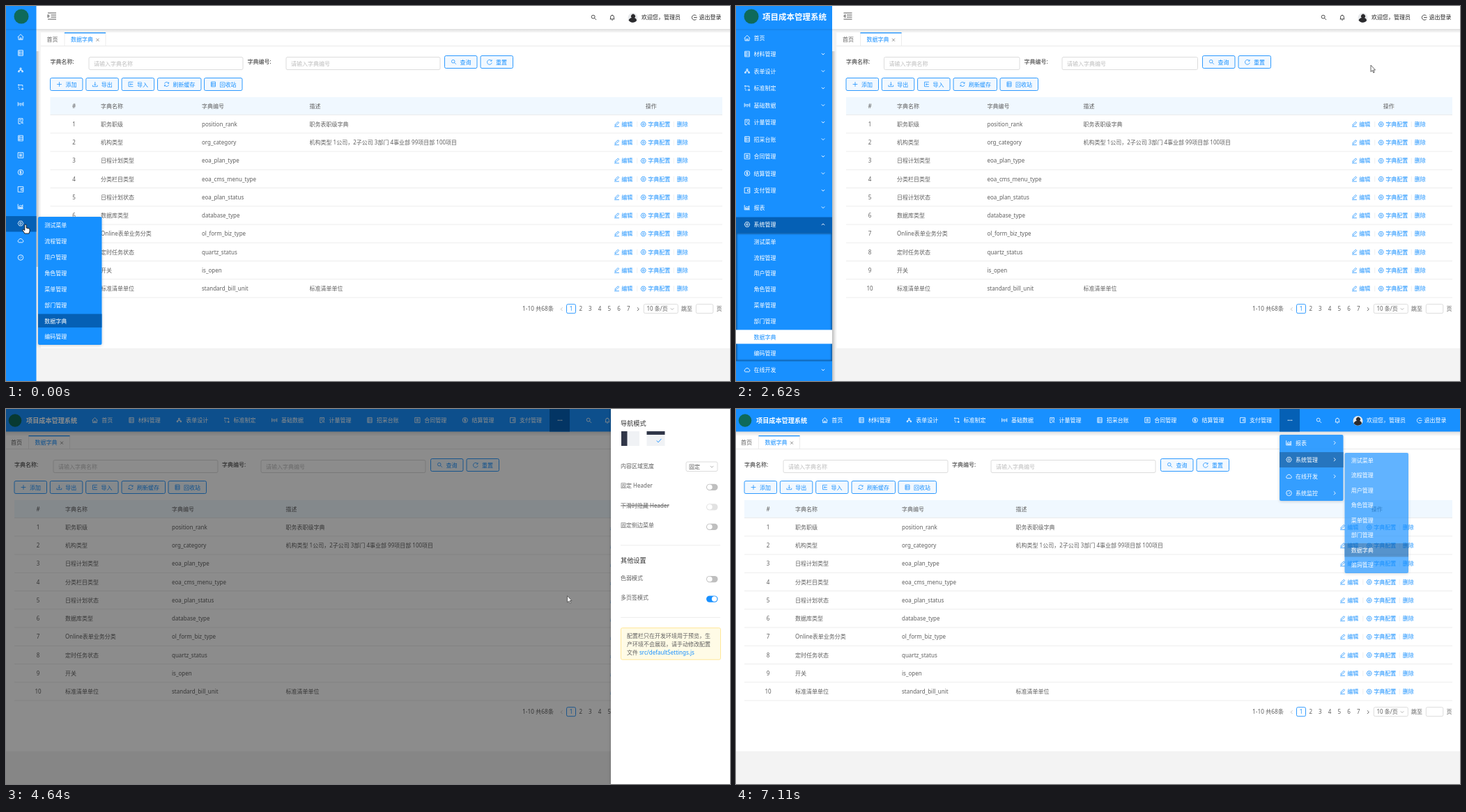
Recreate the animation shown at these times as an HTML page. Size 1039x539 px, loop 7190 ms.

```html
<!DOCTYPE html>
<html lang="zh-CN">
<head>
<meta charset="utf-8">
<style>
html, body { margin: 0; width: 100%; height: 100%; overflow: hidden; background: #fff; }
svg { display: block; width: 100vw; height: 100vh; }
text { font-family: "Noto Sans", "Noto Sans CJK SC", "Noto Sans CJK", sans-serif; white-space: pre; }
</style>
</head>
<body>
<svg viewBox="0 0 1039 539">
  <defs>
    <linearGradient id="side"><stop stop-opacity=".22"/><stop offset="1" stop-opacity="0"/></linearGradient>
    <linearGradient id="down" x2="0" y2="1"><stop stop-opacity=".09"/><stop offset="1" stop-opacity="0"/></linearGradient>
    <filter id="soft" x="-20%" y="-20%" width="140%" height="140%"><feDropShadow dx="0" dy="1" stdDeviation="2" flood-opacity=".2"/></filter>
    <filter id="blur"><feGaussianBlur stdDeviation="1.3"/></filter>
  </defs>
  <g id="page"></g>
  <g id="over"></g>
</svg>
<script>
const LOOP = 7190, W = 1039, H = 539;
const BLUE = '#1890ff', DARK = '#0560b5', INK = '#606060', LINE = '#e8e8e8';

const ring = 'M-4 0A4 4 0 1 0 4 0A4 4 0 1 0-4 0';
const icons = {
  home: 'M-4.4.4L0-4 4.4.4M-3.2-.4V4H3.2V-.4M-1 4V1.5H1V4',
  doc: 'M-3.5-4H3.5V4H-3.5ZM-3.5-1.3H3.5M-3.5 1.4H3.5M-2-2.6H-1M-2 0H-1M-2 2.7H-1',
  tree: 'M-1-3H1V-1H-1ZM0-1V.4M-2.7 1.6V.4H2.7V1.6M-3.6 1.6H-1.8V3H-3.6ZM1.8 1.6H3.6V3H1.8Z',
  crop: 'M-3-4.2V-2M-4.2-3H3V-.6M-3-.8V1.4M3 .8V4.4M-3 3H-1M.4 3H4.4',
  radio: 'M-4-3V3M4-3V3M-2.2-1.8V1.8M2.2-1.8V1.8M0-1V3M-.8-1H.8',
  audit: 'M0 4H-3.2V-4H3.2V0M-1.6-2H1.6M-1.6 0H0M.6 1.8A1.3 1.3 0 1 0 3.2 1.8A1.3 1.3 0 1 0 .6 1.8M2.8 2.8L4 4',
  list: 'M-4-4H4V4H-4ZM-2-1.6H2M-2 0H2M-2 1.6H2',
  money: ring + 'M1.4-1.2C.6-2.2-1.4-1.9-1.4-.9S1.4 0 1.4 1-.8 2.2-1.5 1.2M0-2.6V2.6',
  wallet: 'M-4-4H4V4H-4ZM4-1.3H.5V1.3H4',
  chart: 'M-4-3.5V3.5H4M-2.4 2.4V.2L-.6-1.6 1 0 3-2.4V2.4ZM-2 1.5H3',
  gear: 'M-2-3.5H2L4 0 2 3.5H-2L-4 0ZM-1.4 0A1.4 1.4 0 1 0 1.4 0A1.4 1.4 0 1 0-1.4 0',
  cloud: 'M-2.5 3A2 2 0 0 1-2.8-.8A3 3 0 0 1 2.8-.8A2 2 0 0 1 2.5 3Z',
  gauge: ring + 'M0 1L1.8-1.2M-2.4.6H-1.8M0-2.5V-1.9',
  pencil: 'M-4 4H4M-3 2.2L-2.6.2 2.2-4.2 3.8-2.6-1 1.8Z',
  search: 'M-3.6-1A2.7 2.7 0 1 0 1.8-1A2.7 2.7 0 1 0-3.6-1M1.2 1L4 3.8',
  reload: 'M3.2-2A4 4 0 1 0 3.8 1.2M3.6-4V-1.6H1.2',
  sync: 'M3.4-1.6A3.8 3.8 0 0 0-3.6-1M-3.4 1.6A3.8 3.8 0 0 0 3.6 1M3.6-3.6V-1.4H1.6M-3.6 3.6V1.4H-1.6',
  plus: 'M-4 0H4M0-4V4',
  load: 'M0-4V1.6M-1.8 0L0 1.8 1.8 0M-4 1.4V3.8H4V1.4',
  into: 'M4-3.8H-3.6V3.8H4M-1 0H3.6M-1.6 0L.2-1.6M-1.6 0L.2 1.6',
  bell: 'M-3.6 2.6H3.6M-2.7 2.6V-.8A2.7 2.7 0 0 1 2.7-.8V2.6M0-4.4V-3.5M-1 4H1',
  exit: 'M3-2.6A4 4 0 1 0 3 2.6M-1 0H4.2',
  wrench: 'M-3.8 3.8L.4-.4M3.6-2.6A2.4 2.4 0 1 1 1.8-3.8L1.6-2Z',
  fold: 'M-6-4.5H6M-1.5-1.5H6M-1.5 1.5H6M-6 4.5H6M-6-2L-3.6 0-6 2Z',
  unfold: 'M-6-4.5H6M-1.5-1.5H6M-1.5 1.5H6M-6 4.5H6M-3.6-2L-6 0-3.6 2Z',
  down: 'M-2.2-1.1L0 1.1 2.2-1.1', up: 'M-2.2 1.1L0-1.1 2.2 1.1',
  left: 'M1.1-2.4L-1.3 0 1.1 2.4', right: 'M-1.1-2.4L1.3 0-1.1 2.4',
  close: 'M-2-2L2 2M2-2L-2 2', check: 'M-3.2 0L-1 2.4 3.4-2.6',
};

const menu = [['home', '首页'], ['doc', '材料管理'], ['tree', '表单设计'], ['crop', '标准制定'], ['radio', '基础数据'],
  ['audit', '计量管理'], ['doc', '招采台账'], ['list', '合同管理'], ['money', '结算管理'], ['wallet', '支付管理'],
  ['chart', '报表'], ['gear', '系统管理'], ['cloud', '在线开发'], ['gauge', '系统监控']];
const subMenu = ['测试菜单', '流程管理', '用户管理', '角色管理', '菜单管理', '部门管理', '数据字典', '编码管理'];
const rows = [['职务职级', 'position_rank', '职务表职级字典'],
  ['机构类型', 'org_category', '机构类型 1公司，2子公司 3部门 4事业部 99项目部 100项目'],
  ['日程计划类型', 'eoa_plan_type'], ['分类栏目类型', 'eoa_cms_menu_type'], ['日程计划状态', 'eoa_plan_status'],
  ['数据库类型', 'database_type'], ['Online表单业务分类', 'ol_form_biz_type'], ['定时任务状态', 'quartz_status'],
  ['开关', 'is_open'], ['标准清单单位', 'standard_bill_unit', '标准清单单位']];

// Horizontal positions for each navigation layout
const slim = { L: 0, in1: 119, lab2: 346.5, in2: 402, w: 221, btn: 629, name: 136, code: 281, desc: 435.5, op: 0 };
const wide = { L: 94.5, in1: 212.5, lab2: 413.5, in2: 468, w: 194.5, btn: 669, name: 231, code: 360.5, desc: 498.5, op: 11 };
const full = { L: -51.5, in1: 68, lab2: 310, in2: 366, w: 236, btn: 609, name: 85, code: 238, desc: 401.5, op: -6 };

// Pointer path: time, x, y, hand (1) or arrow (0)
const path = [[0, 28, 314, 1], [1090, 28, 314, 1], [1480, 53, 137, 0], [1740, 65, 22, 1], [2140, 65, 22, 1],
  [2600, 911, 85, 0], [2660, 911, 85, 0], [3000, 932, 14, 1], [3160, 932, 14, 1], [3300, 932, 37, 1],
  [4140, 932, 37, 1], [4320, 937, 36, 1], [4480, 937, 36, 1], [4780, 700, 455, 0], [5230, 700, 455, 0],
  [5460, 799, 9, 1], [5780, 799, 9, 1], [5950, 807, 46, 1], [6030, 809, 65, 1], [6280, 809, 65, 1],
  [6600, 905, 110, 1], [6950, 930, 548, 0], [LOOP, 930, 548, 0]];

const mix = (a, b, u) => a + (b - a) * u;
const ramp = (t, a, b) => Math.min(1, Math.max(0, (t - a) / (b - a)));
const smooth = u => u * u * (3 - 2 * u);

// cubic-bezier(.7, .3, .1, 1)
function glide(u) {
  let lo = 0, hi = 1;
  const at = (s, a, b) => 3 * s * (1 - s) ** 2 * a + 3 * s * s * (1 - s) * b + s ** 3;
  for (let i = 0; i < 20; i++) {
    const s = (lo + hi) / 2;
    if (at(s, .7, .1) < u) lo = s; else hi = s;
  }
  return at(lo, .3, 1);
}

const rect = (x, y, w, h, fill, more = '') => `<rect x="${x}" y="${y}" width="${w}" height="${h}" fill="${fill}" ${more}/>`;
const box = (x, y, w, h, stroke, fill = '#fff') => rect(x, y, w, h, fill, `rx="2" stroke="${stroke}" stroke-width=".9"`);
const text = (x, y, s, fill = INK, size = 8, more = '') =>
  `<text x="${x}" y="${y + size * .37}" font-size="${size}" fill="${fill}" ${more}>${s}</text>`;
const mid = (x, y, s, fill) => text(x, y, s, fill, 8, 'text-anchor="middle"');
const icon = (name, x, y, color, k = 1) =>
  `<path d="${icons[name]}" transform="translate(${x} ${y}) scale(${k})" fill="none" stroke="${color}" stroke-width=".9"/>`;
const group = (s, attrs) => `<g ${attrs}>${s}</g>`;

function button(x, y, w, name, label) {
  return box(x, y, w, 18, BLUE, '#f1f8ff') + icon(name, x + 13, y + 9, BLUE, .85) + text(x + 22, y + 9.3, label, BLUE);
}

function userBar(dx, color) {
  return icon('search', 843.5 + dx, 16.5, color, .9) + icon('bell', 870 + dx, 16.5, color, .9) +
    `<circle cx="${899.5 + dx}" cy="17" r="7" fill="#e8eaec"/>
     <path d="M${893.5 + dx} 20.5Q${895 + dx} 17 ${898 + dx} 17A3 3 0 1 1 ${902 + dx} 17Q${905 + dx} 18 ${905 + dx} 21A7 7 0 0 1 ${893.5 + dx} 20.5Z" fill="#2b2b2e"/>` +
    text(912 + dx, 16.5, '欢迎您，管理员', color) + icon('exit', 988 + dx, 16.5, color, .9) + text(994.5 + dx, 16.5, '退出登录', color);
}

function content(p, left) {
  const { L } = p, x0 = L + 63.5;
  let s = rect(left, 38, W - left, 454, '#fff') + rect(left, 57, W - left, .9, LINE) +
    text(L + 58.5, 48.5, '首页') + rect(L + 84, 38, 59, 19.5, '#fff', `stroke="${LINE}" stroke-width=".8"`) +
    rect(L + 84, 38, 59, 1.3, BLUE) + text(L + 93, 48.5, '数据字典', BLUE) + icon('close', L + 131.5, 48.7, '#888');
  s += text(x0, 80.5, '字典名称:', '#333') + box(p.in1, 73.5, p.w, 18, '#d9d9d9') + text(p.in1 + 7, 83, '请输入字典名称', '#bfbfbf') +
    text(p.lab2, 80.5, '字典编号:', '#333') + box(p.in2, 73.5, p.w, 18, '#d9d9d9') + text(p.in2 + 7, 83, '请输入字典编号', '#bfbfbf') +
    button(p.btn + .5, 71.5, 46.5, 'search', '查询') + button(p.btn + 52, 71.5, 46.5, 'reload', '重置');
  [[0, 46.5, 'plus', '添加'], [51.3, 46.5, 'load', '导出'], [102.6, 46.5, 'into', '导入'], [154, 62.5, 'sync', '刷新缓存'],
    [221, 54.5, 'doc', '回收站']].forEach(([dx, w, i, label]) => s += button(x0 + dx, 103.5, w, i, label));

  s += rect(x0, 131, 1028 - x0, 25.5, '#f0f8ff') + rect(x0, 156, 1028 - x0, .8, LINE) + mid(L + 97.5, 144, '#') +
    text(p.name, 144, '字典名称') + text(p.code, 144, '字典编号') + text(p.desc, 144, '描述') + mid(925.7 + p.op, 144, '操作');
  rows.forEach(([name, code, desc = ''], i) => {
    const y = 170 + 26.25 * i;
    s += mid(L + 97.5, y, i + 1) + text(p.name, y, name) + text(p.code, y, code) + text(p.desc, y, desc) +
      rect(x0, y + 12.4, 1028 - x0, .8, LINE) + group(
        icon('pencil', 876.5, y, BLUE, .85) + text(883.3, y, '编辑', BLUE) + rect(905.5, y - 4, .7, 8, LINE) +
        icon('gear', 914.7, y, BLUE, .9) + text(921.3, y, '字典配置', BLUE) + rect(957.8, y - 4, .7, 8, LINE) +
        text(962.8, y, '删除', BLUE), `transform="translate(${p.op})"`);
  });

  s += text(741, 435.3, '1-10 共68条', INK, 8.3) + icon('left', 797.5, 435.7, '#bbb') + box(804.5, 428.7, 13, 13, BLUE);
  for (let i = 0; i < 7; i++) s += mid(811 + 13.7 * i, 435.3, i + 1, i ? INK : BLUE);
  return s + icon('right', 907, 435.7, '#555') + box(915.3, 428.7, 49, 13, '#d9d9d9') + text(919.5, 435.3, '10 条/页') +
    icon('down', 956, 435.5, '#aaa') + text(969, 435.3, '跳至') + box(990.3, 428.7, 24.5, 13, '#d9d9d9') + text(1019.5, 435.3, '页');
}

function sidebar(e, grow) {
  const w = mix(43.5, 138, e), ix = mix(21, 16, e), fade = `opacity="${e}"`;
  let s = rect(w, 65, 5, mix(310, 474, e), 'url(#side)') + rect(0, 0, w, H, BLUE) + rect(0, 33, w, 3, 'url(#down)') +
    '<circle cx="22" cy="15" r="10.5" fill="#0e6a5a"/>' + text(38, 16, '项目成本管理系统', '#fff', 11.5, `font-weight="700" ${fade}`);
  menu.forEach(([name, label], i) => {
    let y = (i ? 43 + 24.5 * i : 44.5) + 1.5 * e;
    if (i > 11) y += 184.5 * grow;
    if (i == 11) s += rect(0, y - 10.5, w, 22.5, DARK);
    s += icon(name, ix, y, '#fff', .95);
    if (e) s += text(25.5, y + .2, label, '#fff', 8, fade) + (i ? group(icon(i == 11 ? 'up' : 'down', 125, y, '#fff'), fade) : '');
  });
  if (grow) {
    let sub = rect(0, 326, 138, 184.5, 'none', 'stroke="#000" stroke-opacity=".4" stroke-width="3" filter="url(#blur)"') +
      rect(0, 465.5, 138, 20, '#fff');
    subMenu.forEach((label, i) => sub += text(25.5, 338.7 + 22.85 * i, label, i == 6 ? BLUE : '#fff'));
    s += `<clipPath id="nested"><rect y="326" width="138" height="${184.5 * grow}"/></clipPath>` +
      group(sub, 'clip-path="url(#nested)"');
  }
  return s;
}

function sidePage(e, grow) {
  const p = {};
  for (const k in slim) p[k] = mix(slim[k], wide[k], e);
  const w = mix(43.5, 138, e);
  return rect(0, 0, W, H, '#f3f3f3') + rect(w, 0, W, 33, '#fff') + rect(w, 33, W, 4, 'url(#down)') +
    icon(e < .5 ? 'fold' : 'unfold', 66 + p.L, 14.5, '#444') + userBar(0, '#222') + content(p, w + 6.3) +
    `<clipPath id="bar"><rect width="${w + 6}" height="${H}"/></clipPath>` + group(sidebar(e, grow), 'clip-path="url(#bar)"');
}

function topPage() {
  let s = rect(0, 0, W, H, '#f3f3f3') + rect(0, 0, W, 32.5, BLUE) + rect(0, 32.5, W, 4, 'url(#down)') +
    '<circle cx="13" cy="16.5" r="9.3" fill="#0e6a5a"/>' + text(29, 17, '项目成本管理系统', '#fff', 9.15, 'font-weight="700"');
  menu.slice(0, 10).forEach(([name, label], i) => {
    const x = i ? 111.6 + 68.4 * i : 127.5;
    s += icon(name, x, 16, '#fff', .9) + text(x + 9.8, 16, label, '#fff');
  });
  s += rect(780, 0, 29, 32.5, DARK);
  for (const x of [792.5, 795, 797.5]) s += `<circle cx="${x}" cy="16.3" r=".8" fill="#fff"/>`;
  return s + userBar(-7, '#fff') + content(full, 0);
}

function subPanel(x, y, h, first, step, opacity) {
  let s = rect(x, y, 91.5, h, BLUE, 'rx="2" filter="url(#soft)"') + rect(x, first + 6 * step - 10, 91.5, 19.5, DARK);
  subMenu.forEach((label, i) => s += text(x + 9.3, first + step * i, label, '#fff'));
  return group(s, `opacity="${opacity}"`);
}

function morePanel(opacity) {
  let s = rect(780, 37, 91.5, 95, BLUE, 'rx="2" filter="url(#soft)"') + rect(780, 62, 91.5, 22, DARK);
  menu.slice(10).forEach(([name, label], i) => {
    const y = 48.6 + 24.1 * i;
    s += icon(name, 793.5, y, '#fff', .95) + text(803, y, label, '#fff') + icon('right', 859, y, '#fff');
  });
  return group(s, `opacity="${opacity}"`);
}

function userPanel(hide, hover) {
  let s = rect(885, 36, 91, 58, '#fff', 'rx="2" filter="url(#soft)"');
  if (hover) s += rect(885, 37, 91, 18, '#e6f1fb');
  [['wrench', '系统设置'], ['gear', '密码修改'], ['sync', '清理缓存']].forEach(([name, label], i) =>
    s += icon(name, 895.3, 46.3 + 18.4 * i, INK, .85) + text(903, 46.3 + 18.4 * i, label));
  return group(s, `opacity="${1 - hide}" transform="translate(0 ${36 * .2 * hide}) scale(1 ${1 - .2 * hide})"`);
}

function drawer(open, topNav) {
  const toggle = (y, color, on) => rect(137, y - 4.6, 16.5, 9.4, color, 'rx="4.7"') + `<circle cx="${on ? 148.6 : 141.8}" cy="${y}" r="3.8" fill="#fff"/>`;
  const s = rect(0, 0, 171, H, '#fff', 'filter="url(#soft)"') +
    text(14, 20.5, '导航模式', '#333', 9.2) +
    rect(15, 32, 26, 21, '#f0f2f5') + rect(15, 32, 8.5, 21, '#303648') +
    rect(51.5, 32, 26, 21, '#f0f2f5') + rect(51.5, 32, 26, 5, '#303648') + icon('check', topNav ? 69 : 32.5, 45.5, BLUE) +
    text(14, 82, '内容区域宽度') + box(108, 76, 45, 13.5, '#d9d9d9') + text(112, 83, '固定') + icon('down', 145, 83, '#aaa') +
    text(14, 110.5, '固定 Header') + toggle(112.3, '#bfbfbf') +
    text(14, 139, '下滑时隐藏 Header', INK, 8, 'text-decoration="line-through"') + toggle(140.8, '#e2e2e2') +
    text(14, 167.5, '固定侧边菜单') + toggle(169.3, '#bfbfbf') + rect(14, 195.5, 143, .8, LINE) +
    text(14, 218, '其他设置', '#333', 9.2) + text(14, 243, '色弱模式') + toggle(244.5, '#bfbfbf') +
    text(14, 271, '多页签模式') + toggle(273, BLUE, true) + rect(14, 299.3, 143, .8, LINE) +
    box(14.5, 314.7, 143, 45.5, '#ffe58f', '#fffbe6') + text(23, 326, '配置栏只在开发环境用于预览，生') +
    text(23, 338, '产环境不会展现，请手动修改配置') + text(23, 350, '文件') + text(41, 350, 'src/defaultSettings.js', BLUE);
  return rect(0, 0, W, H, '#000', `opacity="${.45 * open}"`) + group(s, `transform="translate(${W - 171 * open})"`);
}

function pointer(t) {
  const i = path.findIndex(k => k[0] > t), a = path[i - 1], b = path[i];
  const u = smooth(ramp(t, a[0], b[0])), hand = (u < .5 ? a : b)[3];
  const d = hand ? 'M-1.2 1.2A1.2 1.2 0 0 1 1.2 1.2V5L5 5.8Q6 6.2 6 7.5V9.5L5 13H-1.2L-4 8.5Q-4.4 6.8-2.8 7.2L-1.2 8.5Z'
    : 'M0 0V9.5L2.2 7.5 3.8 11 5.2 10.3 3.7 7H6.5Z';
  return `<path d="${d}" transform="translate(${mix(a[1], b[1], u)} ${mix(a[2], b[2], u)})" fill="#fff" stroke="${hand ? '#111' : '#555'}" stroke-width=".9"/>`;
}

function overlays(t) {
  let s = '';
  if (t < 1500) s += subPanel(46, 303, 184, 315.5, 22.85, 1 - ramp(t, 1300, 1500));
  if (t > 3650 && t < 5130) s += drawer(glide(ramp(t, 3650, 3990)) - glide(ramp(t, 4790, 5130)), t >= 4480);
  if (t > 3050 && t < 3930) s += userPanel(1 - ramp(t, 3050, 3200) + ramp(t, 3730, 3930) ** 2, t > 3260);
  if (t > 5600) s += morePanel(ramp(t, 5600, 5780) - ramp(t, 7030, 7645));
  if (t > 6300) s += subPanel(873.5, 63, 173, 74, 21.5, ramp(t, 6300, 6480) - ramp(t, 7030, 7280));
  return s + pointer(t);
}

const shown = {};
function put(id, html) {
  if (shown[id] !== html) document.getElementById(id).innerHTML = shown[id] = html;
}

function frame() {
  const t = performance.now() % LOOP;
  put('page', t < 4480 ? sidePage(smooth(ramp(t, 1960, 2160)), smooth(ramp(t, 2160, 2400))) : topPage());
  put('over', overlays(t));
  requestAnimationFrame(frame);
}
frame();
</script>
</body>
</html>
```
